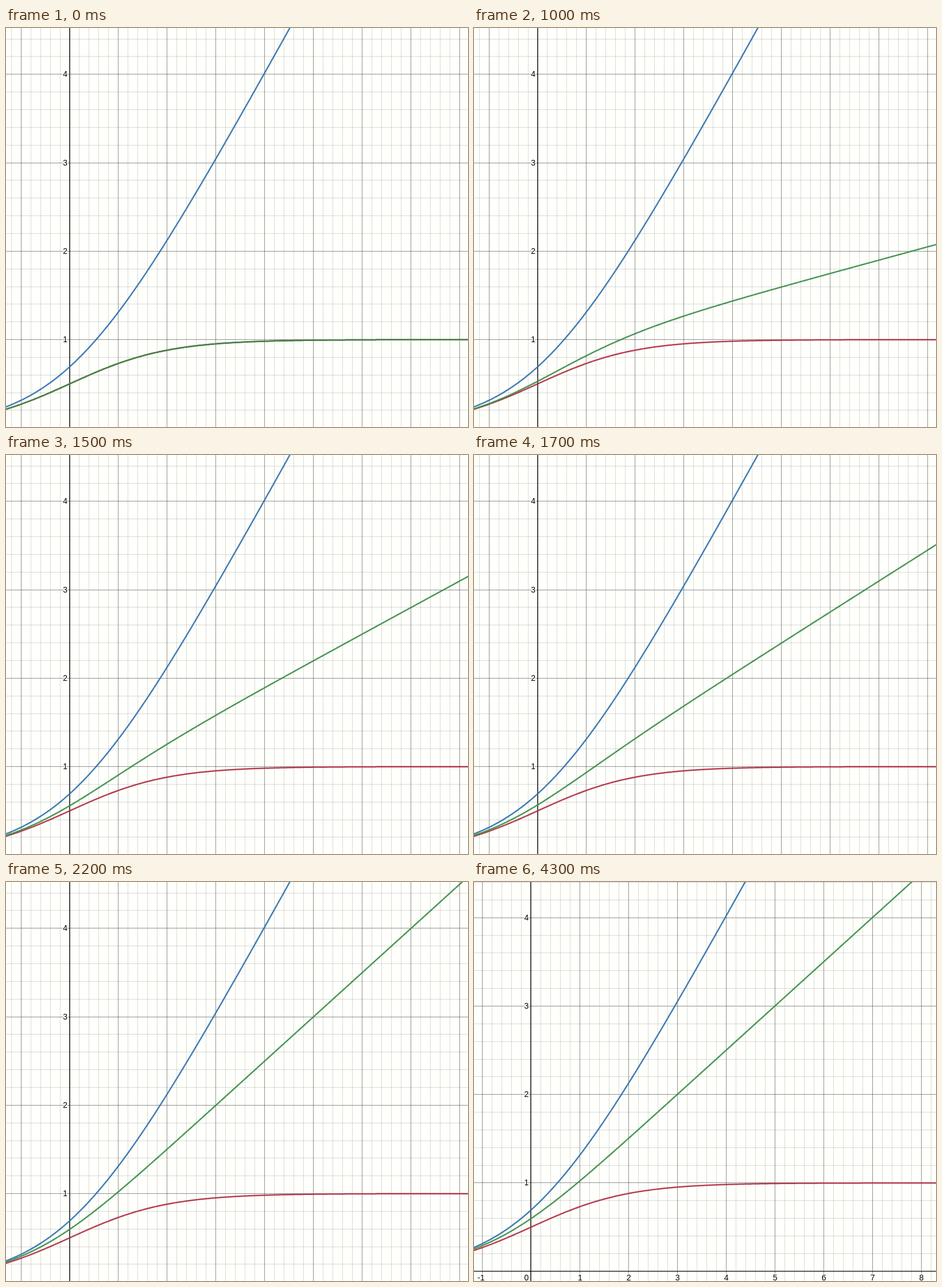
Animation, 805 px wide and 696 px high, one loop 4900 ms. Source, as an HTML page with a canvas:

```html
<!DOCTYPE html>
<html lang="en">
<head>
<meta charset="utf-8">
<title>Blending two curves</title>
<style>
html, body { margin: 0; width: 100%; height: 100%; overflow: hidden; background: #fffffc; }
canvas { display: block; }
</style>
</head>
<body>
<canvas id="stage" width="805" height="696"></canvas>
<script>
const W = 805, H = 696, LOOP = 4900;
const UNIT_X = 84.97, UNIT_Y = 154.25;
const PAPER = '#fffffc';
const STEP_TIMES = [600, 800, 1000, 1200, 1300, 1500, 1700, 1900, 2000, 2200];
const ctx = document.getElementById('stage').getContext('2d');

const softplus = x => Math.log(1 + Math.exp(x));
const sigmoid = x => 1 / (1 + Math.exp(-x));
const mix = (a, b, k) => a + (b - a) * k;

function line(x1, y1, x2, y2, color, width) {
  ctx.strokeStyle = color;
  ctx.lineWidth = width;
  ctx.beginPath();
  ctx.moveTo(x1, y1);
  ctx.lineTo(x2, y2);
  ctx.stroke();
}

// Grid lines sit on whole pixels; every fifth one is a unit line.
function drawGrid(ox, oy) {
  const shade = i => i % 5 ? 'rgba(0,0,0,0.15)' : 'rgba(0,0,0,0.43)';
  for (let i = -10; i <= 45; i++) {
    if (i === 0) continue;
    const x = Math.floor(ox + i * UNIT_X / 5) + 0.5;
    const y = Math.floor(oy - i * UNIT_Y / 5) + 0.5;
    line(x, 0, x, H, shade(i), 1);
    line(0, y, W, y, shade(i), 1);
  }
}

function label(text, x, y) {
  ctx.strokeStyle = PAPER;
  ctx.lineWidth = 3;
  ctx.strokeText(text, x, y);
  ctx.fillStyle = '#000';
  ctx.fillText(text, x, y);
}

function drawLabels(ox, oy) {
  ctx.font = '14px "Liberation Sans", Arial, sans-serif';
  ctx.lineJoin = 'round';
  ctx.textAlign = 'right';
  for (let n = 1; n <= 4; n++) label(n, ox - 4, oy - n * UNIT_Y + 4.5);
  const base = oy + 16;
  label(0, ox - 4, base);
  ctx.textAlign = 'center';
  label('-1', ox - UNIT_X - 2, base);
  for (let n = 1; n <= 8; n++) label(n, ox + n * UNIT_X + 0.5, base);
}

function drawAxes(ox, oy) {
  const x = Math.round(ox), y = Math.round(oy);
  line(x, 0, x, H, 'rgba(0,0,0,0.85)', 1.7);
  line(0, y, W, y, 'rgba(0,0,0,0.85)', 1.7);
}

function drawCurve(fn, color, ox, oy) {
  ctx.strokeStyle = color;
  ctx.lineWidth = 2.5;
  ctx.beginPath();
  for (let px = -4; px <= W + 4; px += 2) {
    ctx.lineTo(px, oy - UNIT_Y * fn((px - ox) / UNIT_X));
  }
  ctx.stroke();
}

function drawCursor(x, y) {
  ctx.beginPath();
  const shape = [[0, 0], [0, 15], [3.4, 11.8], [6, 17.6], [8.3, 16.6], [5.8, 11], [10, 10.7]];
  for (const [dx, dy] of shape) ctx.lineTo(x + dx, y + dy);
  ctx.closePath();
  ctx.strokeStyle = '#fff';
  ctx.lineWidth = 2;
  ctx.stroke();
  ctx.fillStyle = '#1c1c1c';
  ctx.fill();
}

function draw(t) {
  const panned = t >= 4300;
  const ox = panned ? 99.3 : 111;
  const oy = panned ? 679.2 : 697.84;
  const blend = 0.05 * STEP_TIMES.filter(s => t >= s).length;

  ctx.fillStyle = PAPER;
  ctx.fillRect(0, 0, W, H);
  drawGrid(ox, oy);
  drawLabels(ox, oy);
  drawAxes(ox, oy);
  drawCurve(softplus, 'rgba(45,112,170,0.9)', ox, oy);
  drawCurve(sigmoid, 'rgba(173,45,62,0.9)', ox, oy);
  drawCurve(x => mix(sigmoid(x), softplus(x), blend), 'rgba(56,140,70,0.9)', ox, oy);
  if (t >= 4200 && !panned) drawCursor(124, 6);
}

const start = performance.now();
function tick() {
  draw((performance.now() - start) % LOOP);
  requestAnimationFrame(tick);
}
tick();
</script>
</body>
</html>
```
